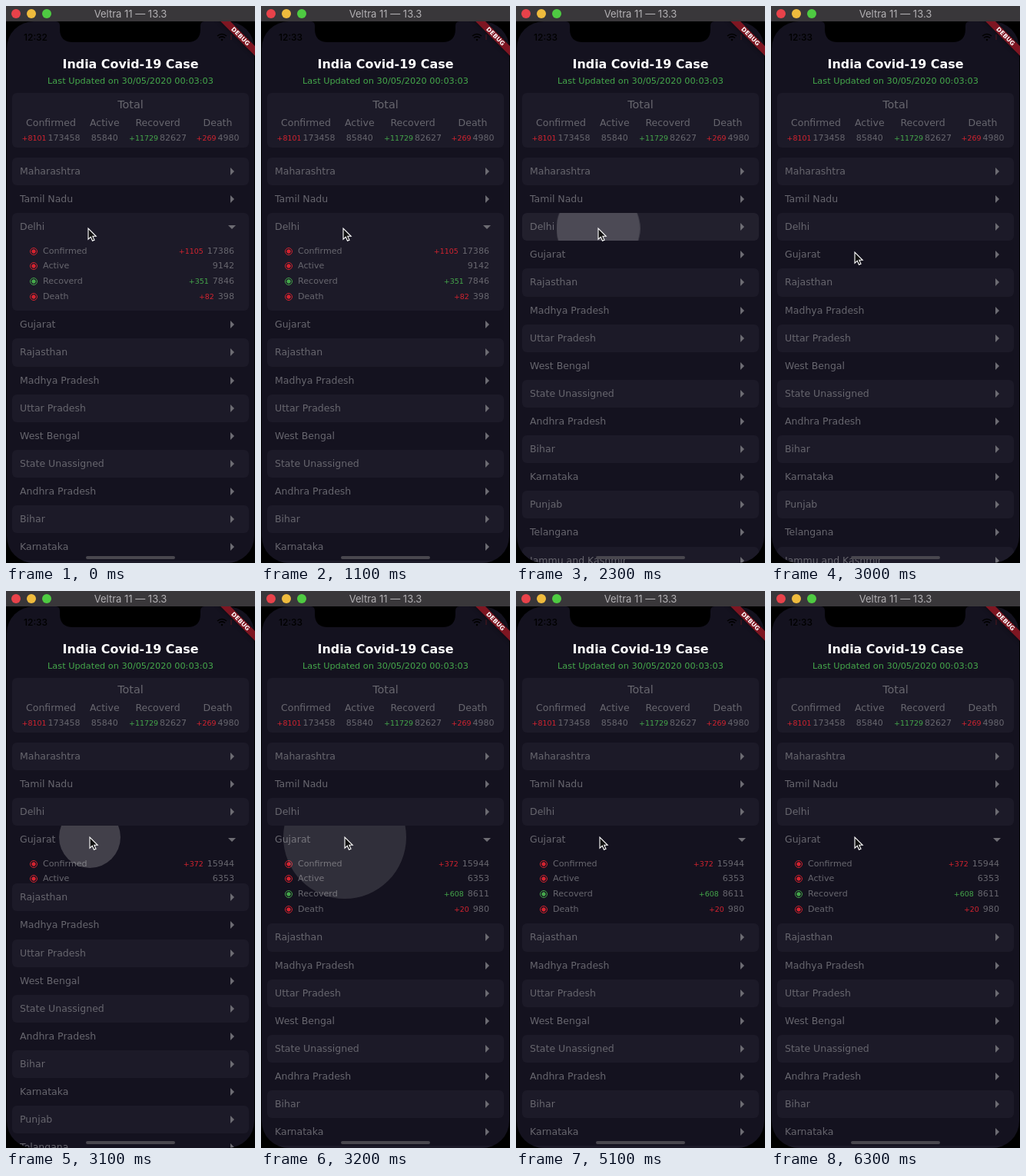
Write an HTML page that moves like this. It is 324 px wide and 724 px high and loops after 8000 ms.

```html
<!DOCTYPE html>
<html lang="en">
<head>
<meta charset="utf-8">
<title>India Covid-19 Case</title>
<style>
  :root { --bg: #14121f; --card: #1c1a28; --grey: #67666e; --red: #d4232f; --green: #45a84b; --row: 36.12px; --open: 127.1px; }
  * { box-sizing: border-box; }
  html, body { margin: 0; width: 100%; height: 100%; overflow: hidden; background: #000; }
  #stage { position: relative; width: 324px; height: 724px; overflow: hidden; background: #000;
    color: var(--grey); font: 12.5px "DejaVu Sans", Verdana, sans-serif; white-space: nowrap; }
  #stage div, #stage svg { position: absolute; }

  #bar { inset: 0 0 auto; height: 20px; background: #39373a; color: #b3b1b4;
    font: 13px/20px Inter, sans-serif; text-align: center; }
  #bar i { position: absolute; top: 4px; width: 12px; height: 12px; border-radius: 50%; }

  #screen { inset: 20px 1px 0; background: var(--bg); border-radius: 35px; overflow: hidden; }
  #app { inset: -20px -1px 0; }
  #clock { left: 23px; top: 33px; height: 16px; overflow: hidden; color: #000; font: 500 12px/16px Inter, sans-serif; }
  #clock span { display: block; animation: clock 8s step-end infinite; }
  .line { width: 100%; text-align: center; }
  h1 { position: absolute; margin: 0; top: 66px; width: 100%; text-align: center; color: #fff; font: bold 15.9px/20px "DejaVu Sans", Verdana, sans-serif; }
  #date { top: 90px; color: var(--green); font-size: 11.3px; line-height: 15px; }

  #total { left: 8px; top: 113px; width: 308px; height: 71px; background: var(--card); border-radius: 6px; }
  #total .line { top: 6px; font-size: 14.4px; line-height: 18px; }
  #columns { top: 28.5px; width: 100%; display: flex; justify-content: space-evenly; }
  #columns section { text-align: center; line-height: 20px; }
  #columns p { margin: 0; display: flex; justify-content: center; gap: 2px; font-size: 11px; }
  small { font-size: 9.45px; color: var(--tone); }
  .red { --tone: var(--red); }
  .green { --tone: var(--green); }

  #list { left: 8px; top: 197px; width: 308px; }
  #list .row { position: relative; height: var(--row); line-height: var(--row); padding-left: 10px; border-radius: 6px; overflow: hidden; }
  #list .row:nth-child(odd) { background: var(--card); }
  .arrow { left: 281px; top: 13px; width: 10px; height: 10px; }
  .arrow path { fill: #6d6c73; }
  .details { left: 0; top: 39.5px; width: 100%; line-height: 19.6px; font-size: 11.1px; }
  .details p { position: relative; margin: 0; height: 19.6px; padding: 0 19px 0 40px; display: flex; gap: 5px; }
  .details p span { flex: 1; }
  .details i { position: absolute; left: 23px; top: 5px; width: 10px; height: 10px; border: 1.2px solid var(--tone); border-radius: 50%;
    background: radial-gradient(circle, var(--tone) 2.3px, transparent 3px); }
  .splash { width: 160px; height: 160px; margin: -80px; border-radius: 50%; background: #ccc; opacity: 0; }
  .tint { inset: 0; background: #ccc; opacity: 0; }

  #list .delhi { animation: delhi-height 8s step-end infinite; }
  .delhi .arrow { animation: delhi-arrow 8s step-end infinite; }
  .delhi .splash { left: 99px; top: 20px; animation: delhi-splash 8s step-end infinite; }
  .delhi .tint { animation: tint 8s step-end infinite; }
  #list .gujarat { animation: gujarat-height 8s step-end infinite; }
  .gujarat .arrow { animation: gujarat-arrow 8s step-end infinite; }
  .gujarat .splash { left: 101px; top: 15px; animation: gujarat-splash 8s step-end infinite; }

  #home { left: 104px; top: 714.5px; width: 116px; height: 4px; border-radius: 2px; background: #49474e; }
  #debug { left: 265.2px; top: 34.6px; width: 80px; height: 9.4px; background: #7e1622; color: #fff; transform: rotate(45deg);
    box-shadow: 0 0 5px #0008; font: bold 7.8px/9.4px "DejaVu Sans", sans-serif; text-align: center; }
  #cursor { left: 105px; top: 286.5px; animation: cursor 8s step-end infinite; }

  /* 1.25% is 100 ms */
  @keyframes clock { 0% { transform: none } 6.25%, 100% { transform: translateY(-16px) } }
  @keyframes delhi-height { 0% { height: var(--open) } 27.5% { height: 80px } 28.75%, 100% { height: var(--row) } }
  @keyframes delhi-arrow { 0% { transform: rotate(90deg) } 27.5%, 100% { transform: none } }
  @keyframes delhi-splash {
    0% { opacity: 0 }
    27.5% { opacity: .25; transform: scale(.25) }
    28.75% { opacity: .25; transform: scale(.68) }
    30% { opacity: .12; transform: scale(1.15) }
    31.25%, 100% { opacity: 0 }
  }
  @keyframes tint { 0% { opacity: 0 } 27.5% { opacity: .06 } 28.75% { opacity: .035 } 30%, 100% { opacity: 0 } }
  @keyframes gujarat-height { 0% { height: var(--row) } 38.75% { height: 75px } 40%, 100% { height: var(--open) } }
  @keyframes gujarat-arrow { 0% { transform: none } 38.75%, 100% { transform: rotate(90deg) } }
  @keyframes gujarat-splash {
    0% { opacity: 0 }
    38.75% { opacity: .25; transform: scale(.5) }
    40% { opacity: .16; transform: none }
    41.25% { opacity: .06; transform: scale(1.4) }
    42.5%, 100% { opacity: 0 }
  }
  @keyframes cursor {
    0% { transform: none }
    31.25% { transform: none; animation-timing-function: steps(4) }
    36.25%, 100% { transform: translate(2px, 31px) }
  }
</style>
</head>
<body>
<div id="stage">
  <div id="screen">
    <div id="app">
      <div id="clock"><span>12:32</span><span>12:33</span></div>
      <svg width="324" height="60" fill="none" stroke="#000">
        <path fill="#000" stroke="none" d="M65 20q5 0 5 6v4q0 17 17 17h149q17 0 17-17v-4q0-6 5-6z"/>
        <path stroke-width="1.6" d="M275 39q6-5 12 0M277 41.5q4-3.4 8 0"/>
        <circle cx="281" cy="44" r="1.2" fill="#000" stroke="none"/>
        <path stroke="#421820" stroke-width="1.4" d="M293 37v7"/>
      </svg>
      <h1>India Covid-19 Case</h1>
      <div id="date" class="line">Last Updated on 30/05/2020 00:03:03</div>
      <div id="total"><div class="line">Total</div><div id="columns"></div></div>
      <div id="list"></div>
      <div id="home"></div>
    </div>
  </div>
  <div id="debug">DEBUG</div>
  <div id="bar">
    <i style="left:7px;background:#e8424a"></i><i style="left:27px;background:#efbb3d"></i><i style="left:47px;background:#4ecb42"></i>
    Veltra 11 — 13.3
  </div>
  <svg id="cursor" width="16" height="22">
    <path d="M2 2v14.2l3.3-3 2.2 5 2.5-1.1-2.2-4.8h4.4z" fill="#111" stroke="#fff" stroke-width="1.1"/>
  </svg>
</div>
<script>
  const labels = ['Confirmed', 'Active', 'Recoverd', 'Death'];
  const states = ['Maharashtra', 'Tamil Nadu', 'Delhi', 'Gujarat', 'Rajasthan', 'Madhya Pradesh', 'Uttar Pradesh',
    'West Bengal', 'State Unassigned', 'Andhra Pradesh', 'Bihar', 'Karnataka', 'Punjab', 'Telangana', 'Jammu and Kashmir'];
  const total = ['+8101 173458', '85840', '+11729 82627', '+269 4980'];
  const counts = {
    Delhi: ['+1105 17386', '9142', '+351 7846', '+82 398'],
    Gujarat: ['+372 15944', '6353', '+608 8611', '+20 980'],
  };

  const tone = i => i === 2 ? 'green' : 'red';
  const figures = text => text.replace(/(\+\d+) /, '<small>$1</small>').replace(/(\d+)$/, '<b style="font-weight:400">$1</b>');
  const detail = (text, i) => `<p class="${tone(i)}"><i></i><span>${labels[i]}</span>${figures(text)}</p>`;
  const extras = name => counts[name]
    ? `<div class="details">${counts[name].map(detail).join('')}</div><div class="tint"></div><div class="splash"></div>` : '';
  const row = name => `<div class="row ${counts[name] ? name.toLowerCase() : ''}">${name}
    <svg class="arrow"><path d="M3 0l5 5-5 5z"/></svg>${extras(name)}</div>`;

  document.getElementById('columns').innerHTML = total.map((text, i) =>
    `<section class="${tone(i)}">${labels[i]}<p>${figures(text)}</p></section>`).join('');
  document.getElementById('list').innerHTML = states.map(row).join('');
</script>
</body>
</html>
```
